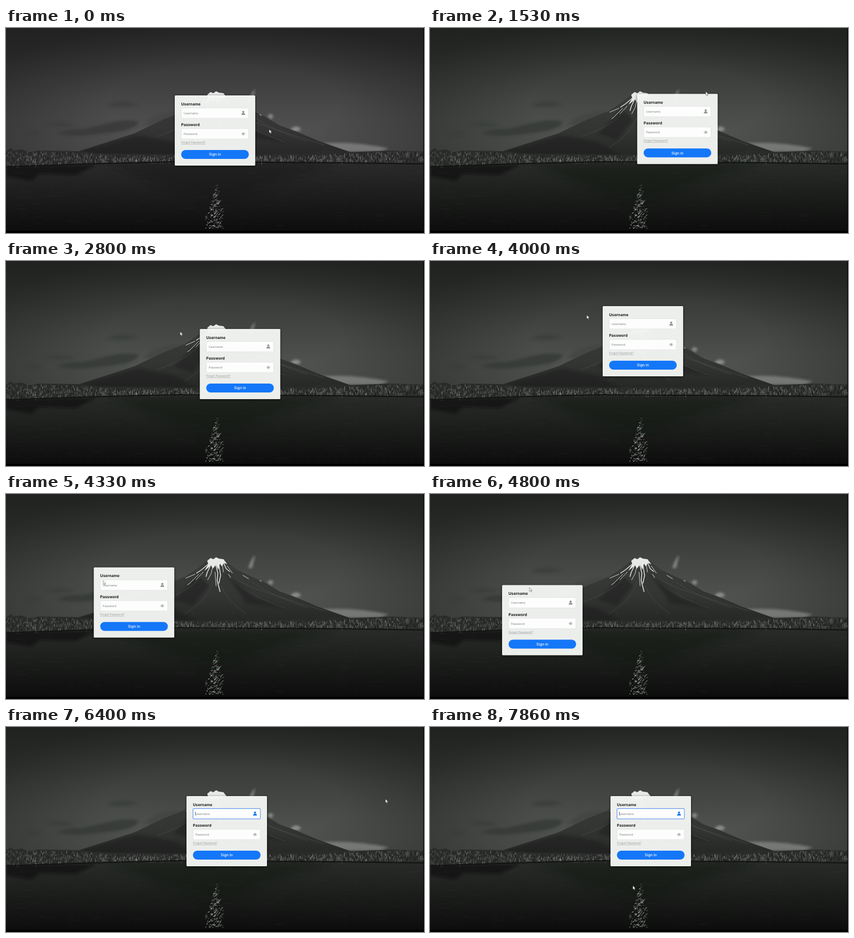
An HTML page that plays this animation: 748 px wide and 368 px high, repeating every 8 s.

```html
<!DOCTYPE html>
<html lang="en">
<head>
<meta charset="utf-8">
<title>Draggable sign-in card</title>
<style>
  html, body { margin: 0; width: 100%; height: 100%; overflow: hidden; background: #000; }
  svg { display: block; width: 100vw; height: 100vh; }
  text { font-family: Inter, "Open Sans", sans-serif; text-rendering: geometricPrecision; }
  .label { font-size: 6.9px; font-weight: 700; fill: #191b1a; }
  .hint { font-size: 5.25px; fill: #7d7f7e; }
  .link { font-size: 5.15px; fill: #989a99; text-decoration: underline; }
  .field { fill: #fcfdfc; stroke: #d9dcda; stroke-width: .6; }
  .icon { fill: #929493; }
  .focused .field { stroke: #3d7fee; stroke-width: .9; }
  .focused .icon { fill: #1677f2; }
</style>
</head>
<body>
<svg viewBox="0 0 748 368" preserveAspectRatio="none">
  <defs>
    <linearGradient id="sky" x2="0" y2="1">
      <stop stop-color="#2b2e2b"/><stop offset=".45" stop-color="#404340"/><stop offset="1" stop-color="#5b5e5b"/>
    </linearGradient>
    <radialGradient id="vignette" cx=".52" cy=".55" r=".62">
      <stop offset=".45" stop-color="#101210" stop-opacity="0"/><stop offset="1" stop-color="#101210" stop-opacity=".42"/>
    </radialGradient>
    <linearGradient id="rock" x2="0" y2="1">
      <stop stop-color="#3b3d3b"/><stop offset=".55" stop-color="#333533"/><stop offset="1" stop-color="#222422"/>
    </linearGradient>
    <linearGradient id="water" x2="0" y2="1">
      <stop stop-color="#2a2c2a"/><stop offset=".35" stop-color="#202220"/><stop offset="1" stop-color="#0c0d0c"/>
    </linearGradient>
    <filter id="soft" x="-30%" y="-60%" width="160%" height="220%"><feGaussianBlur stdDeviation="2.2"/></filter>
    <filter id="wide" x="-30%" y="-60%" width="160%" height="220%"><feGaussianBlur stdDeviation="7"/></filter>
    <filter id="shadow" x="-10%" y="-10%" width="120%" height="120%"><feGaussianBlur stdDeviation="2"/></filter>
  </defs>

  <g id="scene">
    <rect width="748" height="245" fill="url(#sky)"/>
    <rect width="748" height="245" fill="url(#vignette)"/>
    <g filter="url(#soft)">
      <path d="M92 189Q112 179 135 182Q165 175 190 169Q215 163 237 168Q236 177 212 184Q175 190 140 193Q112 195 92 189Z" fill="#383b38" opacity=".85"/>
      <path d="M32 190Q48 181 63 189Q55 195 32 193ZM72 173Q95 164 122 175Q95 180 72 173ZM180 139Q205 126 236 137Q212 145 180 139Z" fill="#3b3e3b" opacity=".75"/>
      <path d="M248 174Q270 148 318 151L290 175Z" fill="#414441" opacity=".8"/>
      <path d="M510 181Q519 173 528 181Q524 188 510 184ZM468 158Q474 151 479 159L473 164ZM434 133Q438 118 446 109L440 133Z" fill="#a2a5a2" opacity=".75"/>
      <path d="M565 207Q620 203 685 216L670 222H585Z" fill="#898c89" opacity=".7"/>
    </g>

    <path d="M122 224L175 207 230 189 280 165 320 149 345 132 361 119 376 114 392 119 410 134 430 144 460 157 490 175 520 186 560 203 600 217 625 226 600 240H130Z" fill="url(#rock)"/>
    <g fill="#1d1f1d" opacity=".5" filter="url(#soft)">
      <path d="M130 224L235 193 300 205 340 228 150 230ZM392 140L445 185 500 205 430 196ZM345 145L363 165 335 200 300 190Z"/>
    </g>
    <g fill="none" stroke="#606360" opacity=".4">
      <path d="M388 138Q415 160 470 178T570 210M400 150Q430 180 500 205M352 145Q330 175 270 195M370 160Q360 190 320 215M384 165Q400 195 430 215M440 158Q480 185 540 204"/>
    </g>
    <g fill="#e6e9e6">
      <path d="M360 120L366 115 371 117 376 113.5 381 116 389 117 393 122 396 126 390 124 386 130 383 125 380 136 376 127 370 134 367 128 355 138 362 126Z"/>
    </g>
    <g fill="none" stroke="#dfe2df" stroke-linecap="round" stroke-linejoin="round">
      <path d="M362 126L350 136 341 142M366 128L360 141 358 148M375 125L379 142 378 156 383 175M381 127L384 146 381 160M390 125L394 134 400 139" stroke-width="1.5"/>
      <path d="M338 144L322 151M345 144L329 160 325 163M353 140L340 154M370 130L367 143 361 154M387 126L389 140M396 129L405 142M398 144L402 150M424 146L434 152M454 155L457 157M374 140L376 165" stroke-width=".9"/>
    </g>

    <rect y="238" width="748" height="126" fill="url(#water)"/>
    <path d="M180 242H590L500 270 410 302 370 312 330 300 250 272Z" fill="#111311" opacity=".4" filter="url(#wide)"/>
    <path d="M0 246H160L125 264 60 262 45 274 0 266Z" fill="#0c0e0c" opacity=".65" filter="url(#soft)"/>
    <path d="M0 222L8 216 14 220 28 218 40 223 60 220 130 221 170 225 320 227 550 225 566 219 574 215 580 220 610 223 690 220 748 222V243L600 241 300 240 150 244 60 247 0 249Z" fill="#292c29"/>
    <g id="reeds" fill="none" stroke-width=".7"></g>
    <path d="M0 249L60 247 150 244 300 240 600 242 748 244" fill="none" stroke="#121412" stroke-width="2.2"/>
    <g id="ripples" fill="none" stroke-width=".6"></g>
    <g id="glints" fill="none" stroke-width=".8" stroke-linecap="round"></g>
    <path d="M0 364H748V368H0ZM746.8 0H748V368H746.8Z" fill="#020102"/>
  </g>

  <g id="card">
    <rect y="1" width="144" height="126" rx="2" fill="#000" opacity=".6" filter="url(#shadow)"/>
    <g id="backdrop"></g>
    <rect width="144" height="126" rx="1.5" fill="#fdfffd" fill-opacity=".93"/>
    <g id="user">
      <text class="label" x="11.5" y="17.7">Username</text>
      <rect class="field" x="11.7" y="22.4" width="120.4" height="18.6" rx="1"/>
      <text class="hint" x="16" y="33.8">Username</text>
      <path id="caret" d="M16.2 28.5V34.8" stroke="#222" stroke-width=".7"/>
      <g class="icon"><circle cx="122.6" cy="29.7" r="1.9"/><path d="M119.4 35.1V33.8Q119.4 31.9 121.4 31.8Q122.6 32.4 123.8 31.8Q125.8 31.9 125.8 33.8V35.1Z"/></g>
    </g>
    <text class="label" x="11.5" y="55">Password</text>
    <rect class="field" x="11.7" y="59.6" width="120.4" height="18.6" rx="1"/>
    <text class="hint" x="16" y="71">Password</text>
    <path d="M119.4 69Q122.6 64.8 125.8 69Q122.6 73.2 119.4 69Z" fill="none" stroke="#929493" stroke-width=".8"/>
    <circle class="icon" cx="122.6" cy="69" r="1.25"/>
    <text class="link" x="11.5" y="86.2">Forgot Password?</text>
    <rect x="11.5" y="98" width="121" height="16" rx="8" fill="#1477f8"/>
    <text x="72" y="108.4" text-anchor="middle" font-size="6.7" font-weight="500" fill="#fff">Sign in</text>
  </g>
  <path id="cursor" d="M0 0V6.6L1.6 5.2 2.7 7.7 3.8 7.2 2.7 4.8H4.8Z" fill="#fff" stroke="#333" stroke-width=".45"/>
</svg>

<script>
const $ = id => document.getElementById(id);
const LOOP = 8000;

let seed = 7;
const random = () => (seed = seed * 16807 % 2147483647) / 2147483647;
const between = (a, b) => a + (b - a) * random();

function strokes(id, color, count, draw) {
  let d = '';
  for (let i = 0; i < count; i++) d += draw();
  const path = document.createElementNS('http://www.w3.org/2000/svg', 'path');
  path.setAttribute('d', d);
  path.setAttribute('stroke', color);
  $(id).append(path);
}

// The reed belt is taller and its shore lower at both sides.
function reed() {
  const x = between(0, 747);
  const side = Math.max(0, 1 - x / 200, (x - 540) / 260);
  const foot = 239 + 7 * Math.max(0, 1 - x / 200);
  const y = between(228 - 7 * Math.min(1, side * 2), foot);
  const height = between(2, 6);
  return `M${x.toFixed(1)} ${y.toFixed(1)}l${between(-1.5, 1.5).toFixed(1)} ${height.toFixed(1)}`;
}
function ripple() {
  return `M${between(0, 740).toFixed(1)} ${between(248, 355).toFixed(1)}h${between(5, 25).toFixed(1)}`;
}
function glint() {
  const depth = Math.sqrt(random());
  const x = 376 - 4 * depth + (random() + random() - 1) * (3 + 20 * depth);
  return `M${x.toFixed(1)} ${(282 + 78 * depth).toFixed(1)}l${between(.4, 2.6).toFixed(1)} ${between(-1.6, .3).toFixed(1)}`;
}
strokes('reeds', '#171917', 500, reed);
strokes('reeds', '#4e514e', 700, reed);
strokes('reeds', '#737673', 420, reed);
strokes('reeds', '#929592', 90, reed);
strokes('ripples', 'rgba(120,125,120,.1)', 180, ripple);
strokes('glints', '#6d706d', 130, glint);
strokes('glints', '#b8bbb8', 75, glint);

// Each key is [time, x, y].
const cardKeys = [
  [0, 302, 121], [1370, 302, 121], [1640, 409, 114], [1780, 395, 95], [2060, 254, 102],
  [2130, 235, 101], [2260, 214, 96], [2420, 228, 83], [2720, 356, 117], [2800, 347, 122],
  [2940, 290, 119], [3070, 263, 102], [3330, 309, 81], [4000, 309, 81], [4200, 215, 105],
  [4450, 129, 152], [4660, 129, 163.5], [4800, 129, 163.5], [5060, 270, 135], [5330, 323, 124]
];
const cursorKeys = [
  [0, 471, 182], [60, 471, 182], [340, 335, 142], [480, 267, 135], [800, 352, 128],
  [930, 352, 128], [1000, 351, 126], [1330, 351, 126], [1560, 500, 112], [1740, 440, 98],
  [1900, 330, 99], [2060, 238, 108], [2130, 235, 106], [2260, 236, 95], [2400, 290, 85],
  [2600, 420, 107], [2700, 392, 122], [2800, 312, 127], [2930, 285, 118], [3060, 300, 98],
  [3230, 358, 86], [3860, 358, 86], [4000, 281, 97], [4200, 180, 132], [4400, 173, 163],
  [4600, 178, 168], [4800, 178, 168], [4950, 300, 150], [5200, 372, 129], [5730, 372, 129],
  [6060, 679, 129.5], [6800, 679, 129.5], [7000, 472, 154], [7330, 472, 154], [7860, 363, 285]
];

// Monotone cubic: smooth motion that never overshoots a key.
function slope(keys, i, axis) {
  if (!i || i === keys.length - 1) return 0;
  const [a, b, c] = keys.slice(i - 1, i + 2);
  const m = (b[axis] - a[axis]) / (b[0] - a[0]);
  const n = (c[axis] - b[axis]) / (c[0] - b[0]);
  return m * n > 0 ? 2 * m * n / (m + n) : 0;
}
function position(keys, t) {
  const next = keys.findIndex(k => k[0] > t);
  if (next < 0) return keys[keys.length - 1].slice(1);
  const a = keys[next - 1], b = keys[next], span = b[0] - a[0], u = (t - a[0]) / span;
  return [1, 2].map(axis => {
    const s = u * u * (3 - 2 * u);
    return a[axis] + (b[axis] - a[axis]) * s
      + span * u * (1 - u) * ((1 - u) * slope(keys, next - 1, axis) - u * slope(keys, next, axis));
  });
}
const place = (id, [x, y]) => $(id).setAttribute('transform', `translate(${x.toFixed(2)} ${y.toFixed(2)})`);

function render(t) {
  place('card', position(cardKeys, t));
  place('cursor', position(cursorKeys, t));
  const focused = t >= 6400;
  $('user').setAttribute('class', focused ? 'focused' : '');
  $('caret').style.display = focused && (t < 6900 || t >= 7400) ? '' : 'none';
  $('scene').style.filter = t < 1330 ? 'grayscale(1)' : 'none';
}

const start = performance.now();
function tick() {
  render((performance.now() - start) % LOOP);
  requestAnimationFrame(tick);
}
render(0);
requestAnimationFrame(tick);
</script>
</body>
</html>
```
